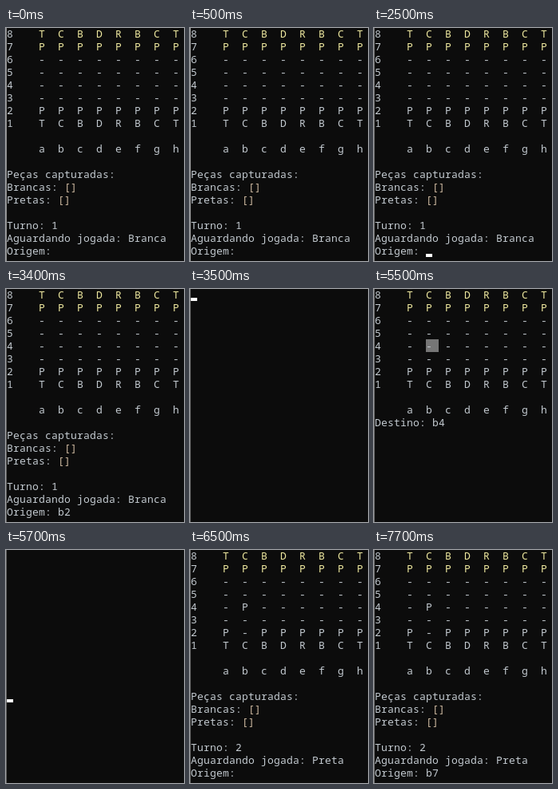
These frames come from a looping animation (223 px wide and 292 px high, 8 s). An HTML page:

```html
<!DOCTYPE html>
<html lang="pt">
<head>
<meta charset="utf-8">
<title>Xadrez no console</title>
<style>
  html, body { margin: 0; width: 100%; height: 100%; overflow: hidden; background: #0c0c0c; }
  svg { display: block; width: 223px; height: 292px; }
  text { font: 13px "Noto Sans Mono", "DejaVu Sans Mono", monospace; letter-spacing: .2px; white-space: pre; }
</style>
</head>
<body>
<svg id="stage" viewBox="0 0 223 292"></svg>
<script>
const LOOP = 8000, CELL_W = 8, CELL_H = 16;
const GRAY = '#c3cad0', YELLOW = '#f0eaa0', TAN = '#cdb9a0', MARK = '#767676';
const stage = document.getElementById('stage');

const cellX = col => 1 + col * CELL_W;
const cellY = row => row * CELL_H - 1;
const rect = (x, y, w, h, fill) =>
  `<rect x="${x}" y="${y}" width="${w}" height="${h}" fill="${fill}"/>`;
const write = (row, col, text, fill = GRAY) =>
  `<text x="${cellX(col)}" y="${cellY(row) + 13}" fill="${fill}">${text}</text>`;
const spread = text => [...text].join('  ');

function board(moved, marked) {
  const empty = '--------';
  const ranks = ['TCBDRBCT', 'PPPPPPPP', empty, empty,
    moved ? '-P------' : empty, empty,
    moved ? 'P-PPPPPP' : 'PPPPPPPP', 'TCBDRBCT'];
  const mark = marked ? rect(cellX(8), cellY(4), 2 * CELL_W, CELL_H, MARK) : '';
  return mark + ranks.map((rank, row) =>
    write(row, 0, 8 - row) + write(row, 5, spread(rank), row < 2 ? YELLOW : GRAY)
  ).join('') + write(9, 5, spread('abcdefgh'));
}

const list = `<tspan fill="${TAN}">[]</tspan>`;
const turn = (number, player, moved) => input => board(moved, false) +
  ['Peças capturadas:', 'Brancas: ' + list, 'Pretas: ' + list, '',
   'Turno: ' + number, 'Aguardando jogada: ' + player, 'Origem: ' + input]
    .map((line, i) => write(11 + i, 0, line)).join('');

const white = turn(1, 'Branca', false);
const black = turn(2, 'Preta', true);
const target = input => board(false, true) + write(10, 0, 'Destino: ' + input);
const blank = () => '';

// [start, screen, typed input, cursor as [row, col] or nothing]
const steps = [
  [0, white, ''],
  [1500, white, '', [17, 8]],
  [2000, white, ''],
  [2500, white, '', [17, 8]],
  [3000, white, ''],
  [3100, white, 'b', [17, 9]],
  [3300, white, 'b2', [17, 10]],
  [3400, white, 'b2'],
  [3500, blank, '', [0, 0]],
  [3600, target, '', [10, 9]],
  [4500, target, ''],
  [4900, target, '', [10, 9]],
  [5000, target, 'b', [10, 10]],
  [5200, target, 'b4', [10, 11]],
  [5500, target, 'b4'],
  [5600, target, 'b4', [11, 0]],
  [5700, blank, '', [11, 0]],
  [5800, black, '', [17, 8]],
  [6500, black, ''],
  [7000, black, '', [17, 8]],
  [7100, black, 'b', [17, 9]],
  [7300, black, 'b7', [17, 10]],
  [7700, black, 'b7']
];

// The window edge darkens when the console gains focus.
const edge = focused => rect(0, 0, 1, 292, focused ? '#606060' : '#909090');

let shown = '';
function draw(time) {
  const [, screen, input, cursor] = steps.findLast(step => step[0] <= time);
  const caret = cursor
    ? rect(cellX(cursor[1]), cellY(cursor[0]) + 12, CELL_W, 4, '#fff') : '';
  const picture = rect(0, 0, 223, 292, '#0c0c0c') + edge(time >= 1000) +
    screen(input) + caret;
  if (picture !== shown) stage.innerHTML = shown = picture;
}

const start = performance.now();
function tick() {
  draw((performance.now() - start) % LOOP);
  requestAnimationFrame(tick);
}
tick();
</script>
</body>
</html>
```
